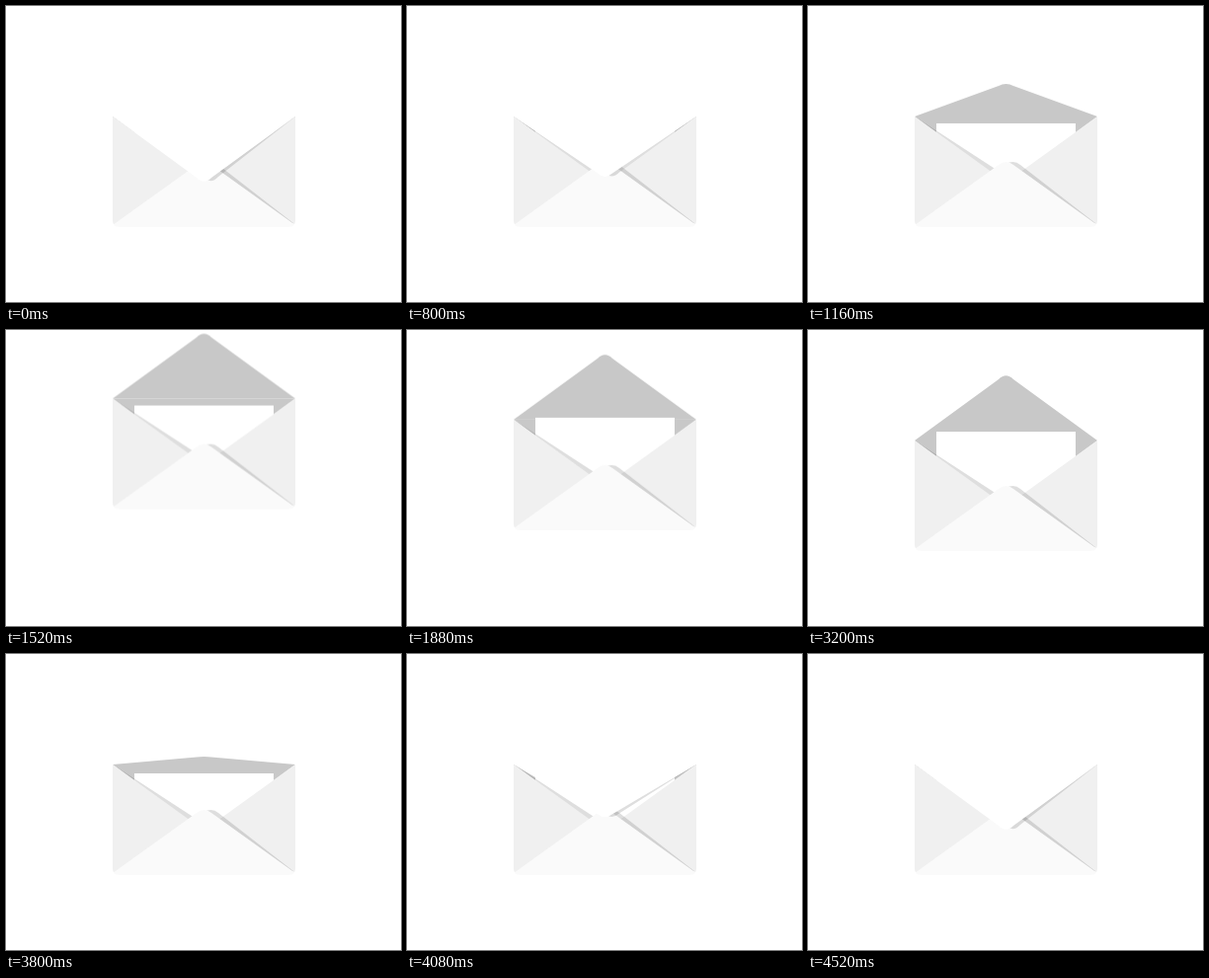
These frames come from a looping animation (400x300 px, 5.12 s). An HTML page without scripts:

```html
<!DOCTYPE html>
<html lang="en">
<head>
<meta charset="utf-8">
<title>Envelope</title>
<style>
  html, body { margin: 0; width: 100%; height: 100%; overflow: hidden; background: #fff; }
  svg { display: block; width: 100%; height: 100%; }

  .lift, .flap, .letter { animation: 5120ms linear infinite; }
  .lift { animation-name: lift; }
  .letter { animation-name: letter; fill: #fff; }
  .flap { animation-name: flap; transform-origin: 0 112px; }

  .inside { fill: #c8c8c8; }
  .side { fill: #f0f0f0; }
  .front { fill: #fafafa; }
  .shade { fill: #000; fill-opacity: .13; }

  /* 1 is closed, -1 is open */
  @keyframes flap {
    0% { transform: scaleY(1); }
    13.67% { transform: scaleY(1); animation-timing-function: cubic-bezier(.5, 0, .75, .6); }
    20.6% { transform: scaleY(0); animation-timing-function: cubic-bezier(.2, .45, .4, 1); }
    29.3%, 67.97% { transform: scaleY(-1); animation-timing-function: cubic-bezier(.5, 0, .75, .6); }
    74.73% { transform: scaleY(0); animation-timing-function: cubic-bezier(.1, .5, .25, 1); }
    88%, 100% { transform: scaleY(1); }
  }
  @keyframes lift {
    0% { transform: translateY(0); }
    22.66% { transform: translateY(0); animation-timing-function: ease; }
    30.08% { transform: translateY(-42.5px); }
    30.47% { transform: translateY(-42.5px); animation-timing-function: ease-in-out; }
    42.97%, 100% { transform: translateY(0); }
  }
  @keyframes letter {
    0% { transform: translateY(0); }
    30.08% { transform: translateY(0); animation-timing-function: ease-in-out; }
    42.97% { transform: translateY(-17px); }
    61.72% { transform: translateY(-17px); animation-timing-function: ease; }
    72.66%, 100% { transform: translateY(2px); }
  }
</style>
</head>
<body>
<svg viewBox="0 0 400 300">
  <defs>
    <path id="flap" d="M108 112L193 174Q200.5 181.5 208 174L293 112z"/>
    <clipPath id="body"><rect x="108" y="90" width="185" height="134" rx="6"/></clipPath>
    <clipPath id="below"><rect x="100" y="112" width="200" height="120"/></clipPath>
  </defs>
  <g class="lift">
    <use class="flap inside" href="#flap"/>
    <path class="inside" d="M108 112H293L200.5 180z"/>
    <rect class="letter" x="130" y="119" width="141" height="88"/>
    <g clip-path="url(#body)">
      <path class="shade" d="M108 112L204 174.5V184z"/>
      <path class="side" d="M108 112L200.5 178.7L108 224z"/>
      <path class="side" d="M293 112L200.5 178.7L293 224z"/>
      <path class="shade" d="M200 160Q209 155.5 215 161L291 220H200z"/>
      <path class="front" d="M108 222L193 161Q200.5 155 208 161L293 222V224H108z"/>
    </g>
    <g clip-path="url(#below)">
      <g class="flap">
        <path class="shade" d="M108 112L200 174Q208 181 215 173L293 112z"/>
        <use href="#flap" fill="#fff"/>
      </g>
    </g>
  </g>
</svg>
</body>
</html>
```
